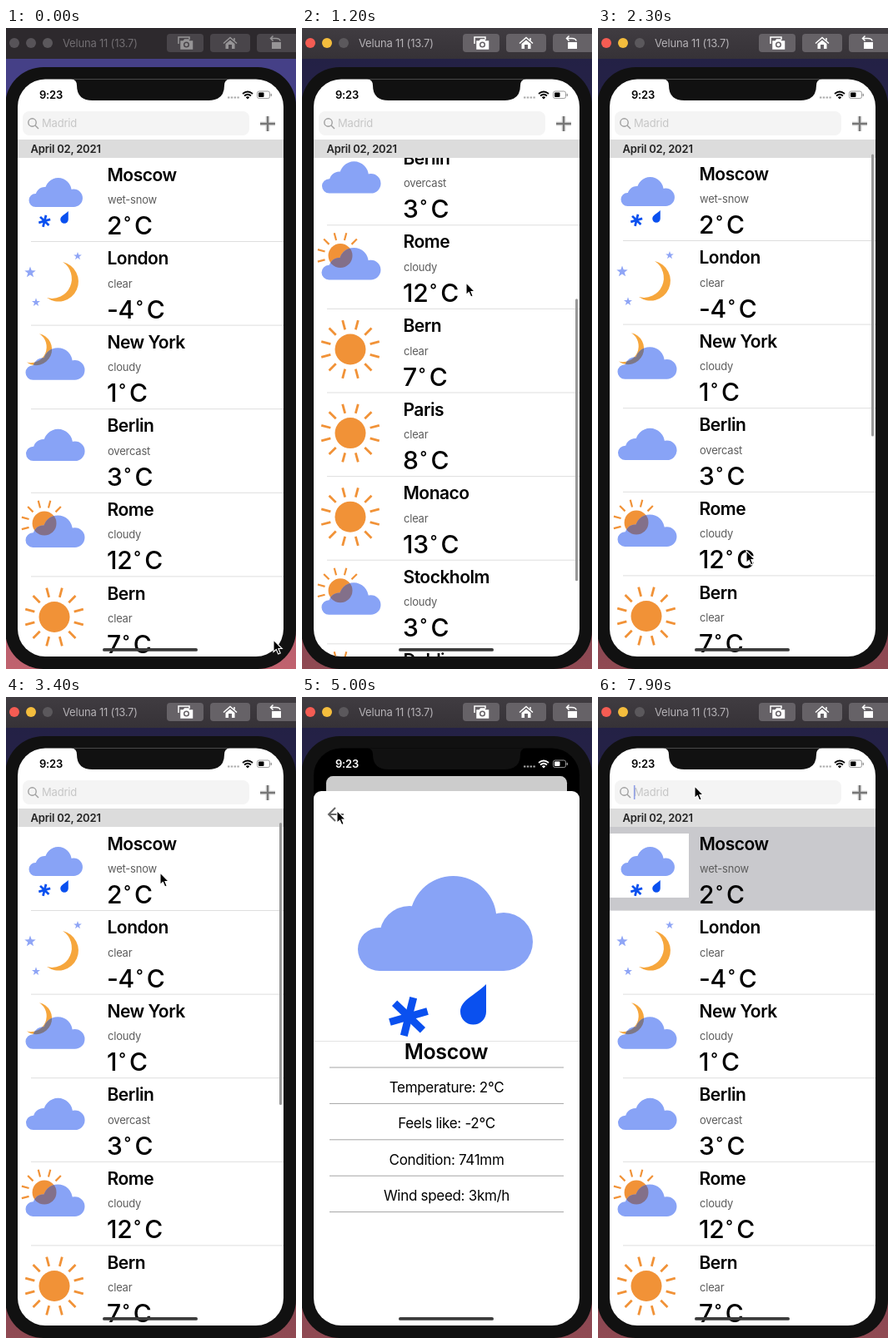
Recreate the animation shown at these times as an HTML page. Size 348x770 px, loop 8000 ms.

```html
<!DOCTYPE html>
<html lang="en">
<head>
<meta charset="utf-8">
<title>Weather list</title>
<style>
html, body { margin: 0; width: 100%; height: 100%; overflow: hidden; background: #111; }
svg { display: block; width: 348px; height: 770px; font-family: Inter, "Open Sans", sans-serif; }
.city { font-size: 21px; font-weight: 600; letter-spacing: -.5px; }
.cond { font-size: 13px; letter-spacing: -.22px; fill: #5c5c5c; }
.temp { font-size: 30px; font-weight: 500; letter-spacing: -.3px; }
.deg { font-size: 19px; }
.info { font-size: 17px; letter-spacing: -.3px; text-anchor: middle; }
</style>
</head>
<body>
<svg viewBox="0 0 348 770">
  <defs>
    <linearGradient id="wall" x2="0" y2="1">
      <stop offset="0" stop-color="#454087"/><stop offset=".1" stop-color="#454087"/>
      <stop offset=".8" stop-color="#a85a72"/><stop offset="1" stop-color="#c0626e"/>
    </linearGradient>
    <linearGradient id="bar" x2="0" y2="1">
      <stop offset="0" stop-color="#403c41"/><stop offset="1" stop-color="#363237"/>
    </linearGradient>
    <linearGradient id="shade" x2="0" y2="1">
      <stop offset="0" stop-opacity=".5"/><stop offset="1" stop-opacity=".25"/>
    </linearGradient>
    <clipPath id="screen"><rect x="14" y="61.5" width="319" height="693.500" rx="33"/></clipPath>
    <clipPath id="listArea"><rect x="14" y="156" width="319" height="599"/></clipPath>
    <path id="cloud" fill="#88a3f6" d=""/>
    <clipPath id="inCloud"><use href="#cloud"/></clipPath>
    <path id="moon" d="M0 0A24 24 0 1 1-19 43A23.800 23.800 0 0 0 0 0"/>
    <path id="star" fill="#8fa5f6" d="M0-7L1.7-2.3 6.7-2.2 2.7.9 4.1 5.7 0 2.8-4.1 5.7-2.7.9-6.7-2.2-1.7-2.3Z"/>
    <g id="wet">
      <use href="#cloud"/>
      <path d="M154 130V163a15.5 15.5 0 1 1-31 0C123 149 140 144 154 130Z" fill="#0a50ef"/>
      <g id="flake" stroke="#0a50ef" stroke-width="9"></g>
    </g>
    <g id="sun" fill="#f19237" stroke="#f19237"></g>
    <g id="risingSun" fill="#f19237" stroke="#f19237"></g>
  </defs>

  <rect width="348" height="770" fill="url(#wall)"/>
  <rect id="shadow" width="348" height="770" fill="url(#shade)"/>
  <rect x="-1" y="47" width="349" height="723" rx="46" fill="#111"/>
  <rect x="14" y="61.500" width="319" height="693.500" rx="33" fill="#000"/>

  <g clip-path="url(#screen)">
    <g id="app">
      <rect class="card" x="14" y="61" width="319" height="710" fill="#fff"/>
      <rect x="20" y="100" width="272" height="29" rx="8" fill="#f4f4f4"/>
      <g fill="none" stroke="#a0a0a0" stroke-width="1.4"><circle cx="31.5" cy="113.5" r="4.7"/><path d="M35 117l4 4"/></g>
      <text x="43" y="119" font-size="13" letter-spacing="-.2" fill="#c6c6c6">Madrid</text>
      <path id="caret" d="M43.7 106V123" stroke="#8f9fe6" stroke-width="1.6"/>
      <path d="M314 106v18M305 115h18" stroke="#ddd" stroke-width="5"/>
      <path d="M314 106v18M305 115h18" stroke="#777" stroke-width="2.4"/>
      <g clip-path="url(#listArea)"><g id="list"></g></g>
      <rect x="14" y="134" width="319" height="22" fill="#dcdcdc"/>
      <text x="29.5" y="150" font-size="13" font-weight="600" letter-spacing="-.2" fill="#222">April 02, 2021</text>
      <rect id="thumb" x="328" y="151" width="3" height="339" rx="1.5" fill="#999"/>
      <rect id="dim" class="card" x="14" y="61" width="319" height="710"/>
    </g>
    <g id="sheet">
      <rect x="14" y="113" width="319" height="680" rx="9" fill="#fff"/>
      <path d="M50 141H32M40 133l-8 8 8 8" fill="none" stroke="#666" stroke-width="2"/>
      <use href="#wet" x="67" y="215"/>
      <path d="M14 413.5H333" stroke="#e4e4e4"/>
      <text class="info" x="173" y="434.5" style="font-size:25px;font-weight:600">Moscow</text>
    </g>
    <path d="M78 61Q85 62 85 69Q85 87 104 87H243Q262 87 262 69Q262 62 269 61Z" fill="#111"/>
    <g id="status" fill="currentColor">
      <text x="40" y="85" font-size="13" font-weight="600" letter-spacing="-.2">9:23</text>
      <path d="M266 83.5H280" stroke="#aaa" stroke-width="2" stroke-dasharray="2.4 1.4"/>
      <path d="M284 79Q290 74 296 79M286 81.500Q290 78 294 81.500" fill="none" stroke="currentColor" stroke-width="1.700"/>
      <path d="M290 85.5L287.800 83.200Q290 81.500 292.200 83.200Z"/>
      <rect x="301.5" y="76" width="15" height="8.6" rx="2.2" fill="none" stroke="#999"/>
      <rect x="303" y="77.5" width="6.5" height="5.6" rx="1"/>
      <rect x="317.6" y="78.7" width="1.4" height="3.4" rx=".7" fill="#999"/>
    </g>
    <rect x="116" y="745" width="114" height="3.8" rx="1.9" fill="#3b3b3b"/>
  </g>

  <rect width="348" height="37" fill="url(#bar)"/>
  <rect id="barDim" width="348" height="37" fill="#2d292d"/>
  <circle class="light" cx="10" cy="18" r="6"/>
  <circle class="light" cx="30" cy="18" r="6"/>
  <circle cx="50" cy="18" r="6" fill="#5b585c"/>
  <g id="tools">
    <text x="68" y="23" font-size="13" letter-spacing="-.2" fill="#b5b2b6">Veluna 11 (13.7)</text>
    <g fill="#666267">
      <rect x="193" y="7" width="44" height="22" rx="4"/><rect x="245" y="7" width="48" height="22" rx="4"/>
      <rect x="301" y="7" width="60" height="22" rx="4"/>
    </g>
    <g fill="none" stroke="#fff" stroke-width="1.5">
      <path d="M207 19V11H220V14"/>
      <path d="M210 16h3l1.5-2h4l1.500 2h3.500v9H210Z" fill="#fff"/>
      <circle cx="216.500" cy="20" r="2.800" stroke="#666267"/>
      <path d="M261 18.500L269 11.500 277 18.500M274 12v3"/>
      <path d="M263.500 19L269 14.500 274.500 19V25H271V20H267V25H263.500Z" fill="#fff" stroke="none"/>
      <path d="M319 17H330V25H319Z" fill="#fff" stroke="none"/>
      <path d="M329 15.500Q328.500 12.500 324 12.500H317.500M320.500 9.500l-3 3 3 3"/>
    </g>
  </g>
  <path id="cursor" d="M0 0V14.500L3.300 11.500 5.700 17 8.200 16 5.900 10.500H10.300Z" fill="#000" stroke="#fff" stroke-width="1.100"/>
</svg>

<script>
const $ = id => document.getElementById(id);
const disc = (x, y, r) => `M${x - r} ${y}a${r} ${r} 0 1 1 ${2 * r} 0a${r} ${r} 0 1 1 ${-2 * r} 0Z`;
const sun = (from, count) => '<circle r="18.500" stroke="none"/>' + [...Array(count)].map((_, i) =>
  `<path d="M0-24.500V-36" stroke-width="2.800" transform="rotate(${from + 30 * i})"/>`).join('');

$('cloud').setAttribute('d', disc(26, 88, 26) + disc(62, 72, 36) + disc(114.5, 52, 52) +
  disc(175, 79, 35) + 'M26 70H175V114H26Z');
$('flake').innerHTML = [14, 74, 134].map(a =>
  `<path d="M61 145.500V192.500" transform="rotate(${a} 61 169)"/>`).join('');
$('sun').innerHTML = sun(15, 12);
$('risingSun').innerHTML = sun(225, 7);

// Icons, drawn relative to the top left of their row
const use = (id, x, y, s = 1, extra = '') =>
  `<use href="#${id}" transform="translate(${x} ${y}) scale(${s})" ${extra}/>`;
const cloudAt = 'translate(23.500 27) scale(.338)';
const behindCloud = (back, shade) => back +
  `<use href="#cloud" transform="${cloudAt}"/>` +
  `<g transform="${cloudAt}"><g clip-path="url(#inCloud)"><g transform="scale(${1 / .338}) translate(-23.500 -27)">${shade}</g></g></g>`;
const halfMoon = color => use('moon', 40, 10, .8, `fill="${color}"`);
const icons = {
  wet: use('wet', 27.5, 24, .307),
  night: use('moon', 68, 24.500, 1, 'fill="#f6a63c"') + use('star', 86, 17.5, .72) +
    use('star', 29, 37) + use('star', 36, 73, .75),
  moonCloud: behindCloud(halfMoon('#f6a63c'), halfMoon('#7d7888')),
  cloud: use('cloud', 24, 24, .336),
  sunCloud: behindCloud(use('risingSun', 46, 36.5, .78), '<circle cx="46" cy="36.500" r="14.500" fill="#83708a"/>'),
  sun: use('sun', 58, 48.5)
};
const rows = [
  ['Moscow', 'wet-snow', 2, 'wet'], ['London', 'clear', -4, 'night'],
  ['New York', 'cloudy', 1, 'moonCloud'], ['Berlin', 'overcast', 3, 'cloud'],
  ['Rome', 'cloudy', 12, 'sunCloud'], ['Bern', 'clear', 7, 'sun'],
  ['Paris', 'clear', 8, 'sun'], ['Monaco', 'clear', 13, 'sun'],
  ['Stockholm', 'cloudy', 3, 'sunCloud'], ['Dublin', 'cloudy', 5, 'sunCloud']
];
$('list').innerHTML = `<g id="picked"><rect x="14" y="156" width="319" height="100.600" fill="#c9c9cd"/>
  <rect x="14" y="164" width="95" height="77" fill="#fff"/></g>` +
  rows.map(([city, cond, temp, icon], i) => `<g transform="translate(0 ${156 + 100.6 * i})">
    ${icons[icon]}
    <text class="city" x="121.500" y="27.500">${city}</text>
    <text class="cond" x="122" y="55">${cond}</text>
    <text class="temp" x="121" y="92">${temp}<tspan class="deg" dx="2" dy="-8">°</tspan><tspan dx="4.500" dy="8">C</tspan></text>
    <path d="M30 100.500H333" stroke="#dedede"/></g>`).join('');

$('sheet').innerHTML += ['Temperature: 2°C', 'Feels like: -2°C', 'Condition: 741mm', 'Wind speed: 3km/h', '']
  .map((line, i) => `<path d="M33 ${445 + 43.4 * i}H314" stroke="#a4a4a4"/>
    <text class="info" x="173.500" y="${475 + 43.4 * i}">${line}</text>`).join('');

// Keys are [time, ...values], eased between neighbours
function track(keys, t) {
  const n = keys.findIndex(k => k[0] > t);
  if (n < 1) return keys.at(n ? -1 : 0).slice(1);
  const a = keys[n - 1], b = keys[n], u = (t - a[0]) / (b[0] - a[0]), e = u * u * (3 - 2 * u);
  return a.slice(1).map((v, i) => v + (b[i + 1] - v) * e);
}
const pointer = [[50, 321, 735], [500, 190, 628], [600, 190, 628], [1150, 197, 306], [1250, 197, 306],
  [2150, 178, 628], [2450, 178, 628], [3200, 185, 211], [4200, 185, 211], [5100, 37, 134],
  [6300, 37, 134], [7100, 116, 107]];
const scrolling = [[600, 0], [1150, 321.5], [1250, 321.5], [2150, 1], [2450, 1], [2600, 0]];
const sheetUp = [[3450, 0], [3850, 1], [5300, 1], [5700, 0]];
const show = (id, on) => $(id).setAttribute('visibility', on ? 'visible' : 'hidden');
const move = (id, x, y, rest = '') => $(id).setAttribute('transform', `translate(${x} ${y}) ${rest}`);

function draw(t) {
  const [x, y] = track(pointer, t), [scroll] = track(scrolling, t), [p] = track(sheetUp, t);
  const active = t >= 500;
  move('cursor', x, y);
  move('list', 0, -scroll);
  move('thumb', 0, scroll * .542);
  move('app', 173.5, 62 + 34 * p, `scale(${1 - .094 * p}) translate(-173.500 -62)`);
  move('sheet', 0, 660 * (1 - p));
  show('sheet', p > 0);
  show('thumb', t >= 620 && t < 3600);
  show('picked', t >= 3450);
  show('caret', t >= 7400 && (t - 7400) % 1000 < 600);
  show('barDim', !active);
  show('shadow', active);
  $('dim').setAttribute('opacity', .2 * p);
  $('status').setAttribute('color', p > .5 ? '#fff' : '#000');
  $('tools').setAttribute('opacity', active ? 1 : .5);
  document.querySelectorAll('.card').forEach(c => c.setAttribute('rx', 9 * p));
  document.querySelectorAll('.light').forEach((c, i) =>
    c.setAttribute('fill', active ? ['#f45c53', '#f4bd3d'][i] : '#575358'));
}
const start = performance.now();
function frame() {
  draw((performance.now() - start) % 8000);
  requestAnimationFrame(frame);
}
draw(0);
frame();
</script>
</body>
</html>
```
